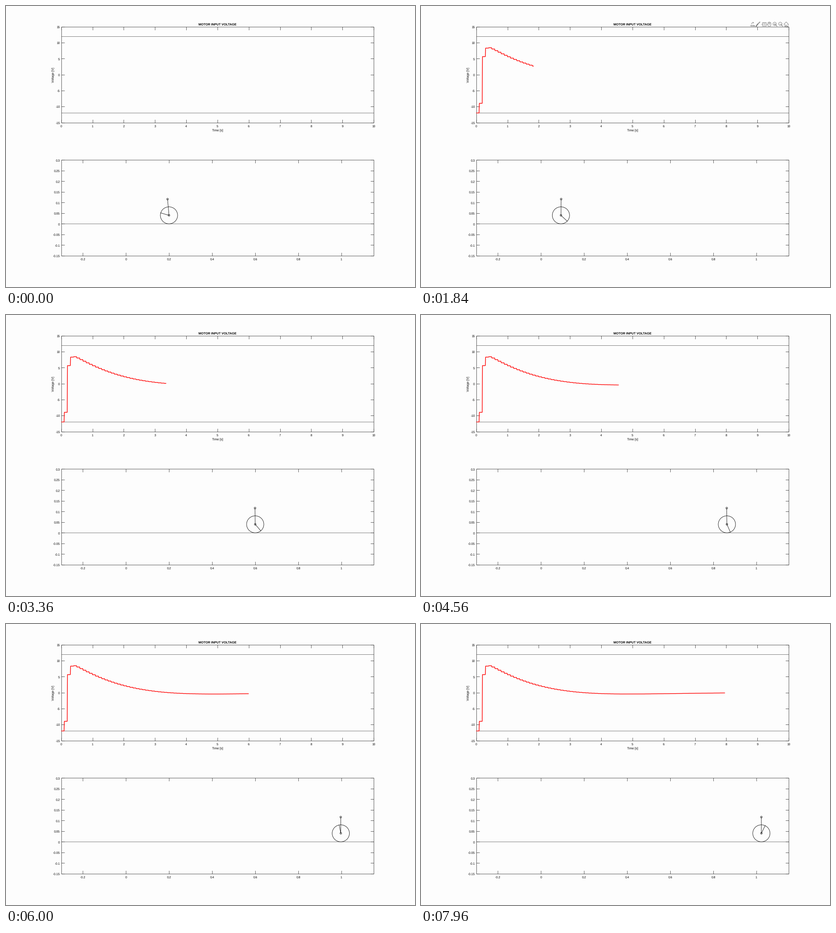
A matplotlib script that plays this animation: 901 by 621 pixels, repeating every 8 s.

```python
import numpy as np
import matplotlib.pyplot as plt
from matplotlib.animation import FuncAnimation
from matplotlib.collections import LineCollection
from matplotlib.patches import Circle, Ellipse, Rectangle

W, H, DPI = 901, 621, 100
FRAMES, STEP = 200, 40
PX = 72 / DPI
INK, PAPER, GREY = "#262626", "#fdfdfd", "#808080"

R, ROD = 0.04, 0.0765        # wheel radius, rod length
GOAL, START = 1.0, 0.2       # wheel position
TILT = np.radians(-5)        # starting lean
SLOW = -0.575 + 0.475j       # poles of the controlled system
FAST = 15.5
LIMIT, HOLD = 12, 0.1        # voltage limit, controller period

plt.rcParams["font.family"] = "Liberation Sans"
plt.rcParams["text.hinting"] = "none"

fig = plt.figure(figsize=(W / DPI, H / DPI), dpi=DPI, facecolor=PAPER)
ax = fig.add_axes([0, 0, 1, 1])
ax.set_xlim(0, W)
ax.set_ylim(H, 0)
ax.axis("off")


def label(x, y, s, size, ha="center", **kw):
    ax.text(x, y, s, fontsize=size * PX, ha=ha, va="center_baseline", color="black", **kw)


class Panel:
    """Boxed plot area that maps data units to stage pixels."""

    def __init__(self, left, top, right, bottom, xlim, ylim):
        self.box = left, top, right, bottom
        self.xlim, self.ylim = xlim, ylim
        self.sx = (right - left) / (xlim[1] - xlim[0])
        self.sy = (bottom - top) / (ylim[1] - ylim[0])

    def x(self, v):
        return self.box[0] + (v - self.xlim[0]) * self.sx

    def y(self, v):
        return self.box[3] - (v - self.ylim[0]) * self.sy

    def level(self, v):
        ax.plot(self.box[::2], [self.y(v)] * 2, color="black", lw=0.5 * PX)

    def frame(self, xticks, yticks, tick=7):
        left, top, right, bottom = self.box
        segs = [[(left, top), (right, top)], [(left, bottom), (right, bottom)],
                [(left, top), (left, bottom)], [(right, top), (right, bottom)]]
        for v in xticks:
            x = self.x(v)
            segs += [[(x, bottom), (x, bottom - tick)], [(x, top), (x, top + tick)]]
            label(x, bottom + 7.5, f"{v:g}", 6.6)
        for v in yticks:
            y = self.y(v)
            segs += [[(left, y), (left + tick, y)], [(right, y), (right - tick, y)]]
            label(left - 2.8, y + 0.5, f"{v:g}", 6.6, ha="right")
        ax.add_collection(LineCollection(segs, colors=INK, linewidths=0.75 * PX))


def swing(t, gain, zero, order=0):
    """Decaying oscillation through zero at the given time, or its derivative."""
    return np.imag(gain * SLOW ** order * np.exp(SLOW * (t - zero)))


def position(t, order=0):
    return swing(t, 0.0883, 6.06, order)


def lean_slow(t):
    return position(t, 2) / 9.81


def wheel_x(t):
    return GOAL + position(t) + (START - GOAL - position(0)) * np.exp(-FAST * t)


def lean(t):
    return lean_slow(t) + (TILT - lean_slow(0)) * np.exp(-FAST * t)


def voltage(t):
    return np.clip(swing(t, -1.55, 3.4) - 91 * np.exp(-FAST * t), -LIMIT, LIMIT)


# controller output, held between samples
samples = np.arange(0, 8.05, HOLD)
volt_t = np.column_stack([samples, samples + 0.9 * HOLD]).ravel()
volt_v = np.repeat(voltage(samples), 2)

volts = Panel(121.7, 45.8, 810, 257.6, (0, 10), (-15, 15))
track = Panel(121.7, 340.4, 810, 551.9, (-0.3, 1.15), (-0.15, 0.3))
for v in (LIMIT, -LIMIT):
    volts.level(v)
track.level(0)
volts.frame(range(11), range(-15, 16, 5))
track.frame([k / 5 for k in range(-1, 6)], [k / 20 for k in range(-3, 7)])
label(466.3, 40.1, "MOTOR INPUT VOLTAGE", 7.05, weight="bold")
label(466.3, 274, "Time [s]", 6.9)
ax.text(103.5, 152, "Voltage [V]", fontsize=6.9 * PX, rotation=90,
        ha="center", va="center", color="black")


def toolbar(y=39.5, gap=12.4):
    parts = []

    def line(cx, *pts, lw=0.9):
        xs, ys = zip(*pts)
        parts.extend(ax.plot(np.add(xs, cx), np.add(ys, y), color=GREY, lw=lw * PX))

    def outline(patch):
        patch.set(fill=False, ec=GREY, lw=0.9 * PX)
        parts.append(ax.add_patch(patch))

    export, brush, tip, hand, plus, minus, home = 730 + gap * np.arange(7)
    line(export, (-4, 2), (-4, 4), (3, 4), (3, 2), (-4, 2))
    line(export, (-2, 0), (-1, -2), (3, -2), (1, -4))
    line(export, (4, 4), (5, 4), lw=1.6)
    line(brush, (4, -4), (-1, 1), lw=1.6)
    line(brush, (-1, 1), (-4, 5), lw=2.4)
    outline(Rectangle((tip - 3, y - 4), 8, 8))
    for dy in (-1.5, 1.5):
        line(tip, (-1, dy), (3, dy))
    line(tip, (-5, 0), (-3, 0))
    line(hand, (-2, 5), (-5, 1), (-3, 1), (-3, -3), (0, -4), (3, -3), (4, 0),
         (3, 5), (-2, 5))
    for dx in (-1, 1):
        line(hand, (dx, -3.5), (dx, 0))
    for cx in (plus, minus):
        outline(Circle((cx - 0.5, y), 3.7))
        line(cx, (2, 2.7), (4.7, 5.2), lw=1.2)
        line(cx, (-2.5, 0), (1.5, 0))
    line(plus, (-0.5, -2), (-0.5, 2))
    line(home, (-5, 1), (0, -4.3), (5, 1))
    line(home, (-3.5, 0), (-3.5, 5), (-1, 5), (-1, 2), (1, 2), (1, 5), (3.5, 5), (3.5, 0))
    return parts


tools = toolbar()
trace, = ax.plot([], [], color="red", lw=1.4 * PX, solid_capstyle="butt")
rod, spoke = (ax.plot([], [], color="black", lw=0.8 * PX, snap=False)[0] for _ in range(2))
wheel = ax.add_patch(Ellipse((0, 0), 2 * R * track.sx, 2 * R * track.sy,
                             fill=False, ec="black", lw=0.8 * PX))
hub, bob = (ax.add_patch(Circle((0, 0), 1.9, fill=False, ec="black", lw=0.75 * PX))
            for _ in range(2))


def update(i):
    t = i * STEP / 1000
    past = volt_t < t
    ts = np.append(volt_t[past], t)
    vs = np.append(volt_v[past], np.interp(t, volt_t, volt_v))
    trace.set_data(volts.x(ts), volts.y(vs))

    x = wheel_x(t)
    centre = track.x(x), track.y(R)

    def arm(line, length, angle):
        end = track.x(x + length * np.sin(angle)), track.y(R + length * np.cos(angle))
        line.set_data(*zip(centre, end))
        return end

    arm(spoke, R, x / R)
    bob.center = arm(rod, ROD, lean(t))
    wheel.center = hub.center = centre

    for part in tools:
        part.set_visible(0.34 < t < 2.94)
    return [trace, rod, spoke, wheel, hub, bob, *tools]


anim = FuncAnimation(fig, update, frames=FRAMES, interval=STEP, repeat=True,
                     repeat_delay=0, blit=False)
plt.show()
```
